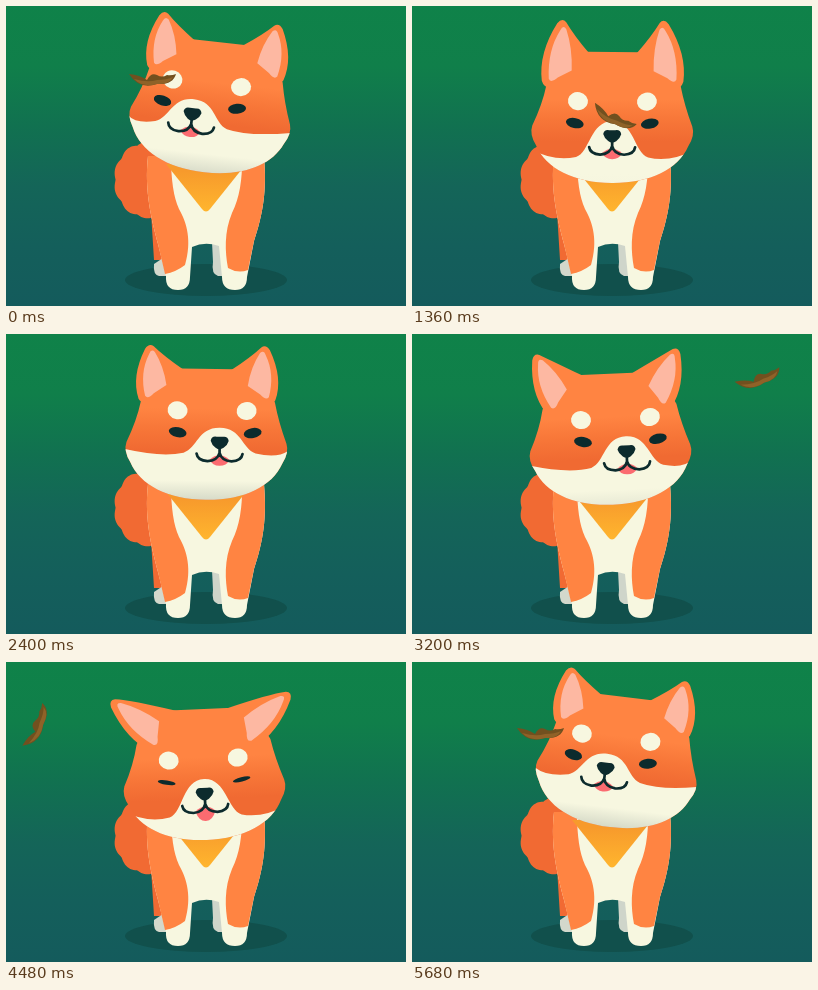
Write an HTML page with a canvas that moves like this. It is 400 px wide and 300 px high and loops after 5.84 s.

```html
<!DOCTYPE html>
<html>
<head>
<meta charset="utf-8">
<style>
html, body { margin: 0; overflow: hidden; background: #14605a; }
canvas { display: block; }
</style>
</head>
<body>
<canvas id="stage" width="400" height="300"></canvas>
<script>
const ctx = document.getElementById('stage').getContext('2d');
const LOOP = 5840, STEP = 80;
const ORANGE = '#ff8442', RUST = '#f16a33', CREAM = '#f7f7e0', INK = '#0c2b2d';

// time, x, y, turn of the leaf: settles on the nose, is blown off the top, drifts back
const leafPath = [
  [0, 147, 73, 0], [720, 191, 116, 2], [1360, 202, 112, 27], [2300, 235, -40, -45],
  [2800, 330, -40, -45], [3200, 347, 45, -18], [3800, 250, 96, 10],
  [4480, 31, 64, -65], [5680, 129, 71, 0]
];

// Smooth cyclic curve through timed keys
function sample(keys, t) {
  const n = keys.length;
  const key = i => keys[(i + n) % n];
  const time = i => key(i)[0] + Math.floor(i / n) * LOOP;
  let i = n - 1;
  while (keys[i][0] > t) i--;
  const span = time(i + 1) - time(i), u = (t - time(i)) / span;
  const slope = (j, k) => (key(j + 1)[k] - key(j - 1)[k]) / (time(j + 1) - time(j - 1)) * span;
  return key(i).map((a, k) => {
    const b = key(i + 1)[k], m = slope(i, k), d = slope(i + 1, k);
    return a + u * (m + u * (3 * (b - a) - 2 * m - d + u * (2 * (a - b) + m + d)));
  }).slice(1);
}

// Cosine hump that rises to 1 at the given moment, wrapping round the loop
function hump(t, peak, reach) {
  const gap = Math.abs(t - peak), d = Math.min(gap, LOOP - gap);
  return d < reach ? (1 + Math.cos(Math.PI * d / reach)) / 2 : 0;
}

function headPose(t) {
  const tilt = -2.5 + 9.5 * hump(t, 5720, 750) + 5 * hump(t, 1900, 1200);
  const pitch = hump(t, 5700, 720) + hump(t, 2550, 1450);
  return {
    tilt, pitch,
    x: 200 + .75 * tilt,
    y: 118 - 12.5 * pitch,
    look: 18 * hump(t, 2900, 1450) - 20 * hump(t, 120, 620),
    spread: 12 * pitch + 65 * hump(t, 4100, 1500),
    smile: hump(t, 4480, 600)
  };
}

const rad = deg => deg * Math.PI / 180;

function fill(path, color) {
  ctx.fillStyle = color;
  ctx.fill(new Path2D(path));
}

function oval(x, y, rx, ry, color, turn = 0) {
  ctx.beginPath();
  ctx.ellipse(x, y, rx, ry, turn, 0, 7);
  ctx.fillStyle = color;
  ctx.fill();
}

function fade(y0, y1, ...stops) {
  const g = ctx.createLinearGradient(0, y0, 0, y1);
  stops.forEach((c, i) => g.addColorStop(i / (stops.length - 1), c));
  return g;
}

function at(x, y, turn, draw) {
  ctx.save();
  ctx.translate(x, y);
  ctx.rotate(rad(turn));
  draw();
  ctx.restore();
}

function mirrored(draw) {
  for (const side of [1, -1]) {
    ctx.save();
    ctx.scale(side, 1);
    draw();
    ctx.restore();
  }
}

function drawTail() {
  ctx.beginPath();
  for (let a = 0; a < 2 * Math.PI; a += .05) {
    const r = .95 + .06 * Math.abs(Math.sin(5 * a));
    ctx.lineTo(141 + 33 * r * Math.cos(a), 174 + 38 * r * Math.sin(a));
  }
  ctx.fillStyle = RUST;
  ctx.fill();
}

function drawBody() {
  ctx.fillStyle = fade(0, 300, '#0f8249', '#107f4a', '#117150', '#146558', '#145f5b', '#145b5c');
  ctx.fillRect(0, 0, 400, 300);
  oval(200, 274, 81, 16, '#11504c');
  drawTail();
  fill('M144 190L148 254H163L166 190Z', RUST);
  fill('M148 258L160 250V270H153Q147 269 148 258Z', '#d3d8cc');
  fill('M206 236H217V270H212Q205 268 207 256Z', '#cfd5ca');
  fill('M142 150C138 185 146 215 152 238L160 270Q159 284 172 284Q184 284 184 271L186 241Q199 235 213 240' +
    'L216 271Q216 284 229 284Q241 284 241 271L248 235C257 208 261 185 258 150Z', CREAM);
  fill('M142 150C138 185 146 215 152 238L159 268Q170 266 179 259C186 235 181 217 173 203Q165 186 165 150Z', ORANGE);
  fill('M236 150Q237 185 226 207C218 226 219 246 222 262Q232 268 242 264L248 235C257 208 261 185 258 150Z', ORANGE);
  fill('M160 158H240L204 203Q200 208 196 203Z', fade(165, 205, '#f79a2c', '#ffb52e'));
}

function drawEars({ pitch, spread }) {
  const c = Math.cos(rad(spread)), s = Math.sin(rad(spread));
  const p = (x, y) => {
    y *= 1 - .18 * pitch;
    return `${-50 + x * c + y * s} ${-55 - x * s + y * c} `;
  };
  return {
    outer: `M-24 -70Q${p(12, -32)}${p(4, -46)}Q${p(0, -51)}${p(-5, -45)}Q${p(-24, -15)}${p(-21, 13)}` +
      `Q${p(-18, 24)}${p(-4, 17)}L-30 -30Z`,
    inner: `M${p(4, -39)}Q${p(1, -44)}${p(-2, -38)}Q${p(-15, -18)}${p(-14, 11)}Q${p(-12, 16)}${p(-5, 10)}` +
      `L${p(9, 3)}Q${p(10, -20)}${p(4, -39)}Z`
  };
}

function drawMouth(smile) {
  const drop = 23 + 4 * smile;
  fill(`M-10 17Q0 8 10 17Q7 ${drop} 0 ${drop}Q-7 ${drop} -10 17Z`, '#fb6b70');
  fill('M-9 -2Q-8 -7 -3 -6H3Q8 -7 9 -2Q8 2 4 5Q0 8 -4 5Q-8 2 -9 -2Z', INK);
  ctx.strokeStyle = INK;
  ctx.lineWidth = 2.7;
  ctx.lineCap = 'round';
  ctx.stroke(new Path2D('M-23 11Q-22 18 -12 18.5Q-2 18 0 10Q2 18 12 18.5Q22 18 23 11M0 4V11'));
}

function drawHead(pose) {
  const { pitch, look, smile } = pose;
  const noseY = 14 - 11.5 * pitch, eyeY = noseY - 13 + 3 * pitch;
  const ears = drawEars(pose);
  mirrored(() => fill(ears.outer, ORANGE));

  ctx.save();
  ctx.clip(new Path2D('M-66 -38Q-70 -18 -80 3Q-83 12 -76 23C-66 46 -38 60 0 60C38 60 66 46 76 23' +
    'Q83 12 80 3Q72 -18 68 -38Q52 -71 26 -71H-26Q-52 -71 -66 -38Z'));
  ctx.fillStyle = fade(eyeY - 24, eyeY + 18, ORANGE, '#f77638', '#f06a32');
  ctx.fillRect(-100, -100, 200, 200);
  const end = noseY + 14 - 7 * pitch, dip = 27 - 12 * pitch;
  const grey = (from, to) => from + (to - from) * pitch;
  ctx.fillStyle = fade(38, 62, CREAM, `rgb(${grey(247, 206)},${grey(247, 211)},${grey(224, 194)})`);
  ctx.translate(look, noseY);
  ctx.fill(new Path2D(`M${-82 - look} ${end - noseY}Q-58 ${dip} -36 ${dip - 5}C-22 ${dip - 10} -22 -15 0 -15` +
    `C22 -15 22 ${dip - 10} 36 ${dip - 5}Q58 ${dip} ${82 - look} ${end - noseY}V80H${-82 - look}Z`));
  ctx.restore();

  mirrored(() => fill(ears.inner, '#fdb8a2'));
  for (const side of [-1, 1]) {
    oval(look * .4 + side * 34.5, eyeY - 22, 10, 9, CREAM, -.2 * side);
    oval(look * .65 + side * 37.5, eyeY, 9, 5 - 2.8 * smile, INK, -.2 * side);
  }
  at(look, noseY, 0, () => drawMouth(smile));
}

function drawLeaf(t) {
  const [x, y, turn] = sample(leafPath, t);
  at(x, y, turn, () => {
    fill('M-24 -5Q-13 -4 -6 1Q-2 -7 4 -4Q9 -1 14 -4Q18 -3 23 -5Q20 6 4 5Q-14 11 -24 -5Z', '#71501f');
    fill('M-19 0Q-5 4 4 1Q14 1 20 -2Q16 6 4 5Q-10 9 -19 0Z', '#8f6228');
  });
}

function frame() {
  const t = Math.min(Math.floor(performance.now() % LOOP / STEP) * STEP, LOOP - 2 * STEP);
  const pose = headPose(t);
  const behind = t > 3300 && t < 4400;
  drawBody();
  if (behind) drawLeaf(t);
  at(pose.x, pose.y, pose.tilt, () => drawHead(pose));
  if (!behind) drawLeaf(t);
  requestAnimationFrame(frame);
}
frame();
</script>
</body>
</html>
```
